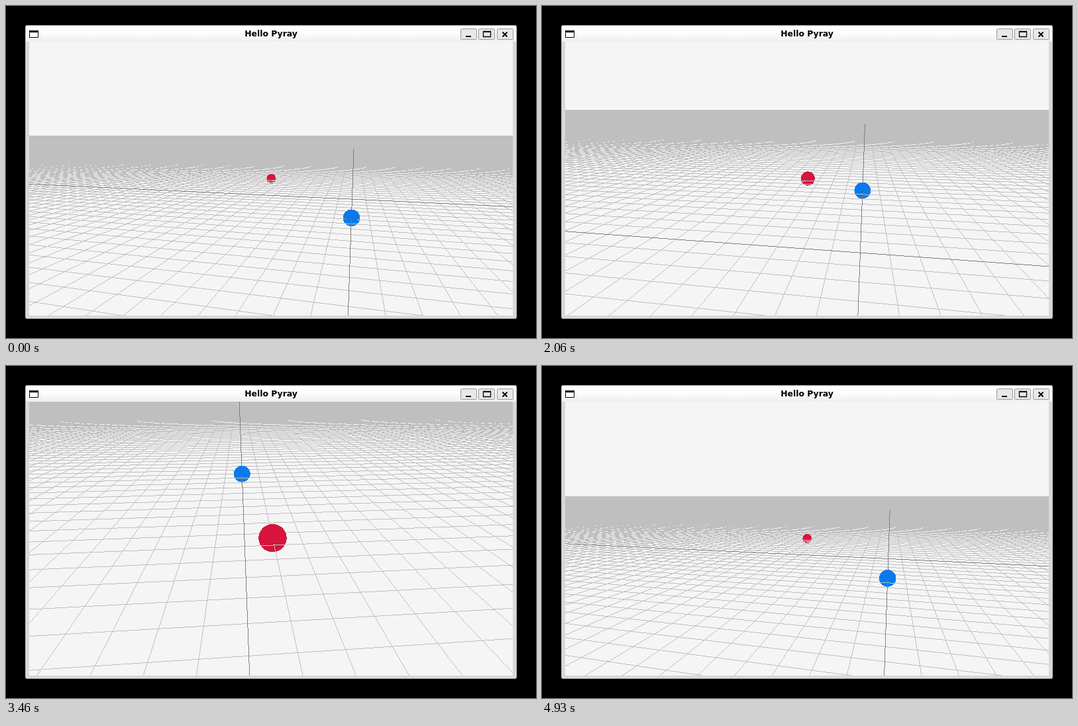
Animation, 800 px wide and 502 px high, one loop 5 s. Source, as an HTML page with a canvas:

```html
<!DOCTYPE html>
<html lang="en">
<head>
<meta charset="utf-8">
<title>Hello Pyray</title>
<style>
  html, body { margin: 0; width: 100%; height: 100%; overflow: hidden; background: #000; }
  svg, canvas { position: absolute; display: block; }
  svg { left: 0; top: 0; }
  canvas { left: 35px; top: 54px; }
  text { font: bold 12.4px "DejaVu Sans", sans-serif; text-anchor: middle; }
</style>
</head>
<body>
<svg width="800" height="502" viewBox="0 0 800 502">
  <defs>
    <linearGradient id="bar" x1="0" y1="0" x2="0" y2="1">
      <stop offset="0" stop-color="#fff"/>
      <stop offset=".45" stop-color="#fdfdfd"/>
      <stop offset="1" stop-color="#eee"/>
    </linearGradient>
    <g id="button">
      <rect x=".5" y=".5" width="24" height="16" rx="1" fill="#e8e8e8" stroke="#999"/>
    </g>
  </defs>
  <rect x="29.500" y="29.500" width="741" height="443" rx="2" fill="#d8d8d8" stroke="#bbb"/>
  <path d="M30 54V32q0-2 2-2H768q2 0 2 2V54z" fill="url(#bar)"/>
  <rect x="35.500" y="37.500" width="13" height="10" fill="#fff" stroke="#000"/>
  <rect x="35" y="37" width="14" height="3"/>
  <text x="400" y="46">Hello Pyray</text>
  <use href="#button" x="686" y="34"/>
  <use href="#button" x="713" y="34"/>
  <use href="#button" x="741" y="34"/>
  <rect x="694" y="45" width="8" height="2"/>
  <path d="M720.500 38.500h11v8h-11zM720 39h12" fill="none" stroke="#000" stroke-width="1.300"/>
  <path d="M749.500 39.500l7 7m0-7l-7 7" stroke="#000" stroke-width="1.900"/>
</svg>
<canvas id="view" width="730" height="414"></canvas>
<script>
  const view = document.getElementById('view');
  const ctx = view.getContext('2d');
  const W = view.width, H = view.height;
  const image = ctx.createImageData(W, H);
  const pixels = new Uint32Array(image.data.buffer);

  const FOCAL = H / 2 / Math.tan(Math.PI / 8);  // 45 degree field of view
  const EYE = 10, CELL = 2, FAR = 1000, AXIS_FAR = 200;
  const FOLLOW = 38.6, FOLLOW_LAG = 0.06, AIM_LAG = 1 / 60;
  const FPS = 15, FRAMES = 75, FIRST = 58;

  const rgb = (r, g, b) => (255 << 24 | b << 16 | g << 8 | r) >>> 0;
  const SKY = rgb(245, 245, 245), LINE = rgb(191, 191, 191), AXIS = rgb(127, 127, 127);
  const RED = rgb(214, 20, 62), BLUE = rgb(10, 122, 234);

  const camAt = t => 50.5 - 9.5 * t - 2.115 * t * t;
  const redAt = t => ({
    x: -17.24 + 2.63 * t + 1.12 * t * t - 0.08 * t * t * t,
    z: -18.8 - 1.2 * t - 0.515 * t * t
  });

  // 0: no line, 1: grid line, 2: axis; one pixel wide along the steeper direction
  function lineAt(pos, du, dv) {
    const half = Math.max(Math.abs(du), Math.abs(dv)) / 2;
    const lo = pos - half, hi = pos + half;
    if (lo < 0 && hi >= 0) return 2;
    return Math.floor(lo) !== Math.floor(hi) ? 1 : 0;
  }

  function draw(t) {
    // the camera trails the blue ball and looks where the red one just was
    const camZ = camAt(t);
    const red = redAt(t), aim = redAt(t - AIM_LAG);
    const blueZ = camAt(t + FOLLOW_LAG) - FOLLOW;

    const reach = Math.hypot(aim.x, aim.z - camZ);
    const fx = aim.x / reach, fz = (aim.z - camZ) / reach;
    const tilt = Math.atan2(EYE, reach);
    const sin = Math.sin(tilt), cos = Math.cos(tilt);

    function ball(x, z, color) {
      const dz = z - camZ;
      const ahead = x * fx + dz * fz, side = dz * fx - x * fz;
      const depth = ahead * cos + EYE * sin;
      const scale = FOCAL / depth;
      return { x, z, color, depth, r2: scale * scale, u: side * scale,
               v: (EYE * cos - ahead * sin) * scale };
    }
    const balls = [ball(red.x, red.z, RED), ball(0, blueZ, BLUE)]
      .filter(b => b.depth > 0)
      .sort((a, b) => a.depth - b.depth);

    // ground position along one pixel row, in cells: x + u * dx, z + u * dz
    function ground(v) {
      const k = EYE / (v * cos + FOCAL * sin);
      const ahead = k * (FOCAL * cos - v * sin);
      return {
        x: fx * ahead / CELL, dx: -fz * k / CELL,
        z: (camZ + fz * ahead) / CELL, dz: fx * k / CELL
      };
    }

    for (let y = 0, i = 0; y < H; y++) {
      const v = y + 0.5 - H / 2;
      const slope = v * cos + FOCAL * sin;
      const depth = slope > 0 ? EYE * FOCAL / slope : Infinity;
      const visible = depth < FAR;
      const near = balls.filter(b => (v - b.v) ** 2 < b.r2);
      const mid = ground(v), top = ground(v - 0.5), low = ground(v + 0.5);

      for (let x = 0; x < W; x++, i++) {
        const u = x + 0.5 - W / 2;
        let color = SKY, gx = 0, gz = 0;
        if (visible) {
          gx = mid.x + u * mid.dx;
          gz = mid.z + u * mid.dz;
          const lx = lineAt(gx, mid.dx, low.x - top.x + u * (low.dx - top.dx));
          const lz = lineAt(gz, mid.dz, low.z - top.z + u * (low.dz - top.dz));
          const kind = Math.max(lx, lz);
          if (kind) color = kind === 2 && depth < AXIS_FAR ? AXIS : LINE;
        }
        for (const b of near) {
          if ((u - b.u) ** 2 + (v - b.v) ** 2 >= b.r2) continue;
          const inFront = color !== SKY && depth < b.depth &&
            Math.hypot(gx * CELL - b.x, gz * CELL - b.z) > 1;
          if (!inFront) color = b.color;
          break;
        }
        pixels[i] = color;
      }
    }
    ctx.putImageData(image, 0, 0);
  }

  let shown = -1;
  const start = performance.now();
  function tick() {
    const ms = Math.max(0, performance.now() - start) % 5000;
    const frame = Math.floor((ms + 7) * FPS / 1000) % FRAMES;
    if (frame !== shown) {
      shown = frame;
      draw((frame < FIRST ? frame : frame - FRAMES) / FPS);
    }
    requestAnimationFrame(tick);
  }
  tick();
</script>
</body>
</html>
```
